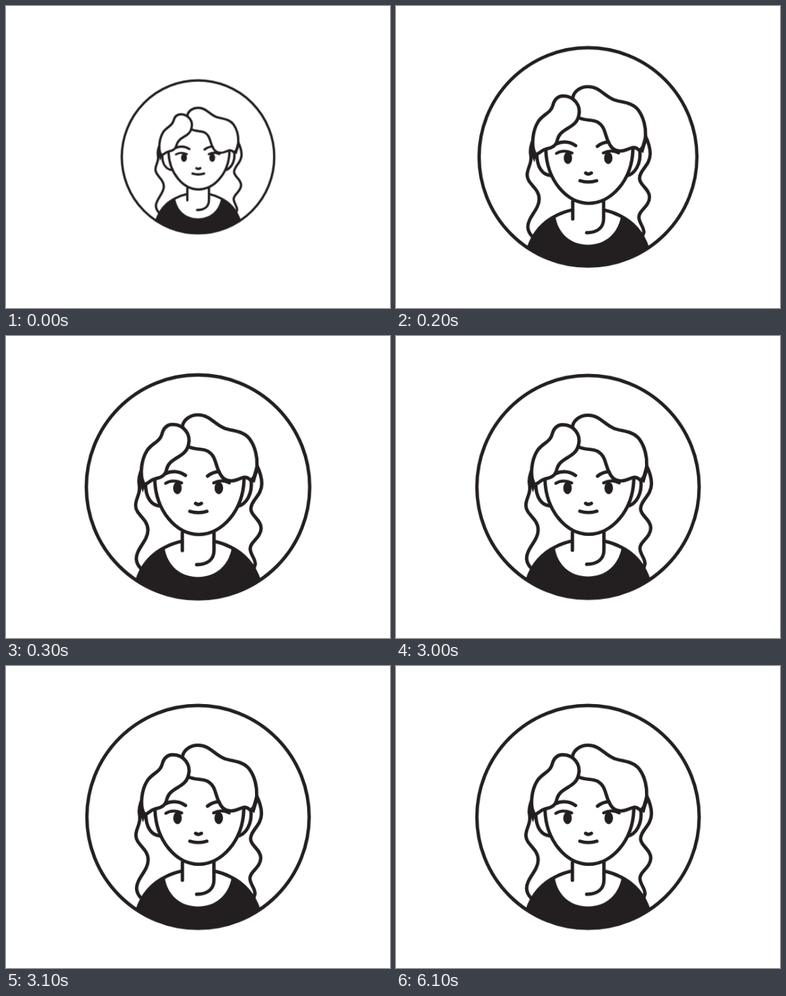
Write an HTML page that moves like this. It is 566x444 px and loops after 8500 ms.

```html
<!DOCTYPE html>
<html lang="en">
<head>
<meta charset="utf-8">
<title>Portrait</title>
<style>
  html, body { margin: 0; width: 100%; height: 100%; overflow: hidden; background: #fff; }
  svg { display: block; width: 100vw; height: 100vh; }
  .portrait {
    --ink: #231f20;
    fill: none;
    stroke: var(--ink);
    stroke-width: 5;
    stroke-linecap: round;
    stroke-linejoin: round;
    transform-origin: 283px 221.8px;
    animation: pop 8.5s step-end infinite;
  }
  .skin { fill: #fff; }
  .solid { fill: var(--ink); stroke: none; }

  /* damped overshoot, one pose per 100 ms */
  @keyframes pop {
    0% { transform: scale(.686); }
    1.176% { transform: scale(1.08); }
    2.352% { transform: scale(.98); }
    3.529% { transform: scale(1.005); }
    4.705% { transform: scale(.999); }
    5.882%, 100% { transform: scale(1); }
  }
</style>
</head>
<body>
<svg viewBox="0 0 566 444">
  <defs>
    <clipPath id="disc"><circle cx="283" cy="221.8" r="164"/></clipPath>
  </defs>
  <g class="portrait">
    <!-- body -->
    <g clip-path="url(#disc)">
      <path class="solid" d="M191 360C197 338 212 321 234 311C238 337 257 353.5 283 353.5C309 353.5 328 337 332.5 311C354 321 369 338 375.5 360V400H191Z"/>
      <path d="M193 360C200 336 216 319 235 310Q247 304 259 301.500M307 301.500Q319 304 331 310C350 319 366 336 373 360"/>
    </g>
    <path d="M260 289V315M306.500 289V314C306.500 328 297 335.500 281 335.500"/>

    <!-- long hair -->
    <path d="M202 193C197 203 195 211 197 220C199 232 191.500 238 191.500 249C191.500 263 209.500 268 209.500 285C209.500 301 192.500 312 192.500 327Q193 335 199 341"/>
    <path d="M369 190C374 200 376.500 208 376.500 217C376.500 235 360.500 241 360.500 254C360.500 264 375.500 270 375.500 282C375.500 296 359.500 302 359.500 312C359.500 321 367 326 367 335L365 341"/>

    <!-- ears and face -->
    <path class="skin" d="M206 217C206 237 214 249 228 250M361 212C363 232 354 248 340 250.500"/>
    <path class="skin" d="M219.500 211C221 257 251 291.500 284 291.500C318 291.500 349 257 350.500 211"/>

    <!-- fringe -->
    <path class="skin" d="M260 133C262 123 272 116.500 283 116.500C301 116.500 307 131 323 136.500C336 140.500 350 140 359 152C367 163 370 178 369.500 190C369 202 365 210 360 212C357 209 354 207 350 208C342 210 338 213.500 331 213C321 212.500 317 207 313 198C308 186 308 176 298 170C289 165 279 168 269 163Z"/>
    <path class="skin" d="M269 160C273 145 262 130.500 246 130.500C237 130.500 232 137 230 145C227 156 215 158 208 169C200 182 197 203 203 218C211 218 211 212 220 210C230 208 235 205 237 196C242 177 265 180 269 160Z"/>
    <path class="solid" d="M199 200L206 217L202 230Q196 218 199 200ZM368 189L371 199L366 216L361 213Z"/>

    <!-- features -->
    <path d="M235 202.500Q250 195.500 264.500 205M297 206Q304.500 200 314 199.500"/>
    <path stroke-width="4.4" d="M235.500 216.500Q246 210 259 216M306 216Q317 210 329 216"/>
    <ellipse class="solid" cx="252.800" cy="223.500" rx="6.300" ry="9"/>
    <ellipse class="solid" cx="313.500" cy="223.500" rx="6.300" ry="9"/>
    <path d="M279.500 246Q283.500 249 288 246M271 257.500Q283.500 261.500 296 257.500"/>

    <circle cx="283" cy="221.800" r="163.800"/>
  </g>
</svg>
</body>
</html>
```
